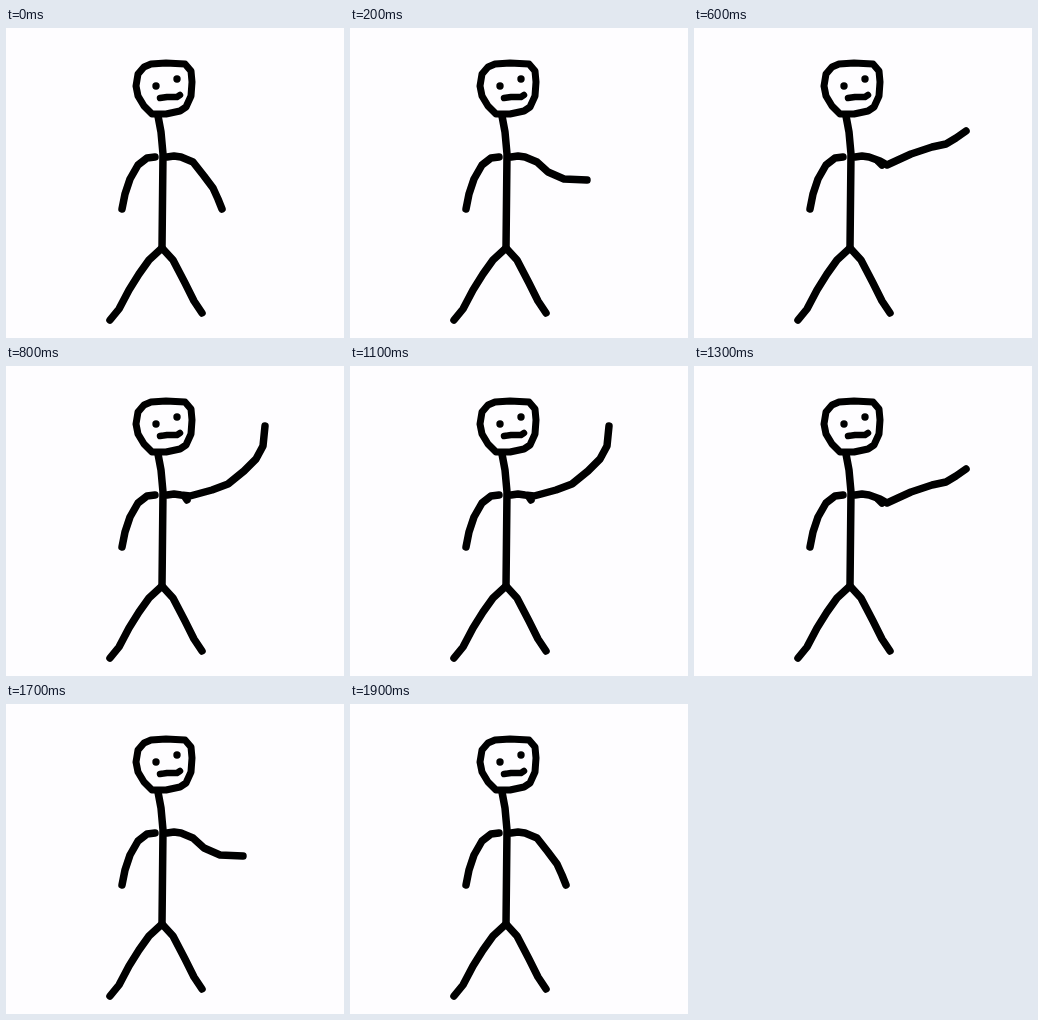
Recreate the animation shown at these times as an HTML page. Size 338 px wide and 310 px high, loop 2 s.

```html
<!DOCTYPE html>
<html lang="en">
<head>
<meta charset="utf-8">
<title>Stick figure raising an arm</title>
<style>
  html, body { margin: 0; width: 100%; height: 100%; overflow: hidden; background: #fefdff; }
  svg { display: block; width: 100%; height: 100%; }
  polyline, polygon { fill: none; stroke: #000; stroke-width: 7.5; stroke-linecap: round; stroke-linejoin: round; }
  #head { stroke-width: 7; }
  #mouth { stroke-width: 6.5; }
</style>
</head>
<body>
<svg viewBox="0 0 338 310">
  <polygon id="head" points="138,39 145,36 160,35 179,36 185,43 186,54 185,68 180,79 174,83 160,86 146,86 138,78 132,68 130,58 132,46"/>
  <circle cx="150" cy="58" r="3.7"/>
  <circle cx="171" cy="51" r="3.7"/>
  <polyline id="mouth" points="154,70 161,69 171,69 174,67"/>
  <polyline points="152,88 155,104 157,126 156,220"/>
  <polyline points="149,129 141,130 132,137 124,151 119,166 116,181"/>
  <polyline points="104,292 113,281 123,262 133,246 143,232 156,220 167,232 179,255 188,273 196,285"/>
  <polyline id="arm"/>
  <polyline id="elbow"/>
</svg>
<script>
  const FRAME_MS = 100;
  const shoulder = "161,129 168,128 175,129 ";

  // Arm poses from hanging to fully raised; the second entry is the elbow nub.
  const poses = [
    ["187,134 198,148 207,160 212,171 216,181"],
    ["187,134 199,148 212,158 228,164"],
    ["187,134 198,144 214,151 237,152"],
    ["188,134 200,140 218,144 244,141"],
    ["186,132 198,134 212,131 236,133 243,132 249,129", "189,134 193,140"],
    ["186,133 195,136 214,130 240,125 263,117"],
    ["186,133 193,137 217,126 238,119 252,116 262,110 272,103", "184,133 188,137"],
    ["185,132 206,127 232,117 255,106 272,89"],
    ["184,130 206,124 222,118 238,105 250,93 257,80 259,60", "179,131 181,134"],
    ["184,130 206,121 223,110 238,92 247,70 248,39", "179,131 181,134"]
  ];
  const arm = document.getElementById("arm");
  const elbow = document.getElementById("elbow");

  function draw(now) {
    const step = Math.floor(now / FRAME_MS) % (2 * poses.length);
    const [forearm, nub = ""] = poses[Math.min(step, 2 * poses.length - 1 - step)];
    arm.setAttribute("points", shoulder + forearm);
    elbow.setAttribute("points", nub);
  }

  let start;
  function tick(now) {
    start ??= now;
    draw(now - start);
    requestAnimationFrame(tick);
  }
  draw(0);
  requestAnimationFrame(tick);
</script>
</body>
</html>
```
